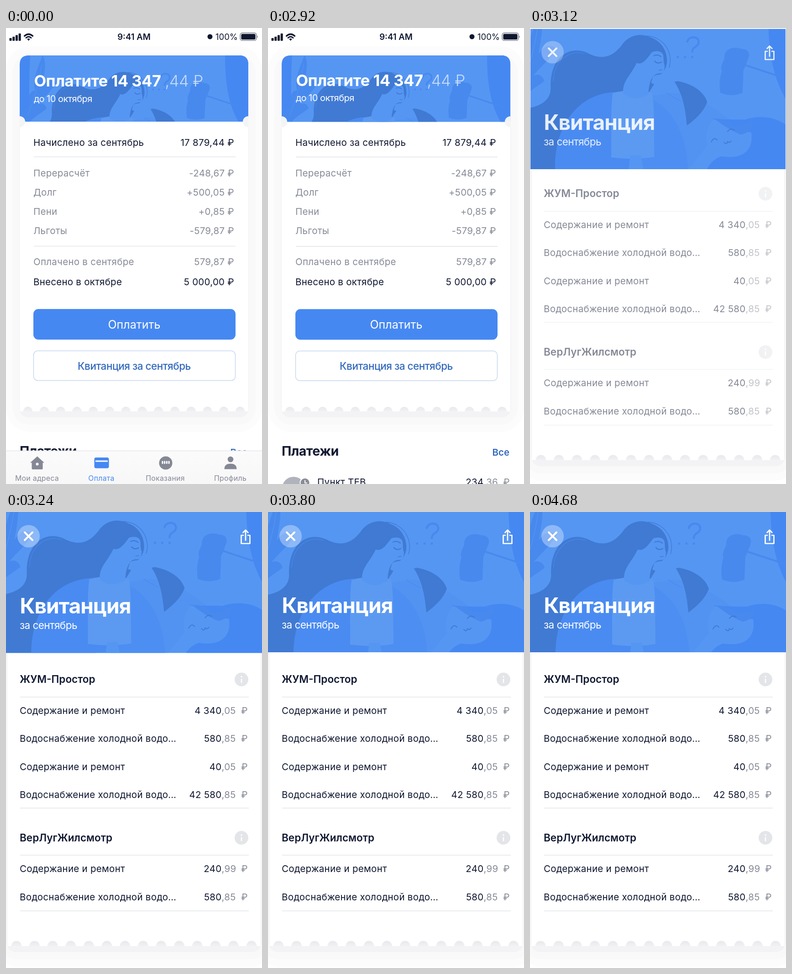
An HTML page that plays this animation: 561 px wide and 998 px high, repeating every 6.68 s.

```html
<!DOCTYPE html>
<html lang="ru">
<head>
<meta charset="utf-8">
<title>Оплата</title>
<style>
html, body { margin: 0; width: 100%; height: 100%; overflow: hidden; background: #fff; }
svg { display: block; width: 100%; height: 100%; font-family: Inter, Roboto, sans-serif; }
text { white-space: pre; }
</style>
</head>
<body>
<svg id="stage" viewBox="0 0 561 998" xmlns="http://www.w3.org/2000/svg"></svg>
<script>
const LOOP = 6680;
const INK = '#0f1730', GREY = '#868a96', BLUE = '#4688f2', LINK = '#3469bd';
const LIGHT = '#5596f3', DARK = '#407ad3', MID = '#4889ee';

const text = (x, y, size, str, { fill = INK, w = 400, a = 'start', ls = 0 } = {}) =>
  `<text x="${x}" y="${y}" font-size="${size}" font-weight="${w}" fill="${fill}" text-anchor="${a}" letter-spacing="${ls}">${str}</text>`;
const line = (x1, x2, y, c = '#e4e6ea') =>
  `<path d="M${x1} ${y}H${x2}" stroke="${c}" stroke-width="1.6"/>`;
const shape = (d, fill, more = '') => `<path d="${d}" fill="${fill}" ${more}/>`;
const stroke = (d, c, w, more = '') =>
  `<path d="${d}" fill="none" stroke="${c}" stroke-width="${w}" stroke-linecap="round" stroke-linejoin="round" ${more}/>`;
const dot = (x, y, r, fill, more = '') => `<circle cx="${x}" cy="${y}" r="${r}" fill="${fill}" ${more}/>`;
const box = (x, y, w, h, r, fill, more = '') =>
  `<rect x="${x}" y="${y}" width="${w}" height="${h}" rx="${r}" fill="${fill}" ${more}/>`;
const ROW = { ls: .27 };

function statusBar() {
  const bars = [6, 9, 12.5, 16].map((h, i) => box(7.5 + i * 6.7, 28 - h, 5, h, 1.2, INK)).join('');
  const wifi = stroke('M40.5 17.5Q49.5 9.5 58.5 17.5', INK, 3.2) +
    stroke('M44 21.5Q49.5 16.5 55 21.5', INK, 3) + shape('M46.3 24.3Q49.5 21.8 52.7 24.3L49.5 28Z', INK);
  const battery = box(513.2, 10.8, 35.6, 16.6, 4.5, 'none', 'stroke="#70747f" stroke-width="1.4"') +
    box(515.4, 13, 31.2, 12.2, 2.5, INK) + shape('M550.5 16.2Q553.4 19 550.5 22Z', '#70747f');
  return bars + wifi + text(280.5, 26, 18.5, '9:41 AM', { w: 600, a: 'middle' }) +
    dot(447, 19, 5.5, INK) + text(508, 26, 18.5, '100%', { a: 'end' }) + battery;
}

function picture() {
  const leaf = shape('M-60 190C-40 130 -30 120 -15 118C-25 90 -12 70 0 72C-10 40 10 5 20 -25C35 -10 22 40 20 62C34 40 48 42 58 50C44 76 24 90 8 110C20 104 30 112 32 122C10 140 -20 150 -40 200Z', MID) +
    stroke('M-20 140Q8 70 18 0', LIGHT, 1.2);
  const right = shape('M528 -80C523 30 530 115 575 175H660V-80Z', BLUE);
  const hand = shape('M430 72C428 52 448 44 468 51C480 51 486 58 484 68C480 78 478 86 472 98L470 148Q446 158 421 148C417 125 421 110 424 100C420 90 426 82 430 72Z', MID) +
    stroke('M474 86L580 121', MID, 4);
  const hair = shape('M-50 185C10 186 50 172 46 132C46 68 88 42 128 60C166 80 188 62 203 43C218 20 246 14 270 27C292 35 305 58 303 82Q300 100 288 108L255 160L190 330H-50Z', DARK) +
    stroke('M258 22C296 24 318 60 308 92', DARK, 1.3) + stroke('M52 122C52 82 84 50 122 62', MID, 1.2);
  const dress = shape('M56 320C52 236 96 150 190 146C250 142 345 170 350 320Z', '#4a8bf2');
  const sleeve = shape('M318 121C352 124 384 142 392 168C384 190 366 206 347 220C344 184 338 150 318 121Z', DARK);
  const arm = shape('M300 150C330 140 390 165 440 206L348 320H230V160Z', '#5092f3', 'opacity=".55"') +
    stroke('M303 148Q316 158 334 166', MID, 1.2);
  const torso = shape('M183 149Q225 136 270 148C276 180 274 240 275 289Q228 297 180 290C181 240 178 190 183 149Z', '#5c9af2') +
    shape('M222 286H245L252 320H218Z', LIGHT);
  const face = shape('M236 82C250 88 262 68 270 58Q286 52 294 62C297 72 294 78 298 88C297 96 299 106 284 105C270 107 263 124 262 151Q230 170 206 149C205 120 222 112 236 82Z', LIGHT) +
    shape('M272 112C284 104 302 106 326 122C310 126 304 122 292 131C284 134 276 129 268 126Z', LIGHT) +
    stroke('M276 78Q282 85 291 80', DARK, 2.4) + stroke('M274 66Q282 62 290 68', DARK, 2.2) + stroke('M285 98L292 97', DARK, 1.4);
  const cat = shape('M404 204C430 208 450 206 476 207C506 196 545 200 570 222V320H390C398 300 412 290 430 286Z', BLUE) +
    shape('M390 250C390 222 401 212 406 206C420 210 424 216 432 221C452 222 468 234 489 235C494 262 482 286 450 289C412 292 390 276 390 250Z', LIGHT) +
    shape('M408 205C428 204 440 210 450 221C470 222 478 216 494 210C490 230 482 237 466 240C446 232 430 222 408 205Z', MID) +
    stroke('M401 256Q407 244 414 252M437 233Q444 224 452 230M429 257Q435 264 437 255Q441 260 445 254', DARK, 2);
  const mark = [327, 343, 359].map(x => dot(x, 69, 2.6, MID)).join('') +
    stroke('M348 35C350 23 373 21 373 36C373 47 359 45 359 57', MID, 4.6);
  return box(-120, -120, 820, 560, 0, BLUE) + shape('M-5 -120H640V400H-20C-4 240 -30 60 -5 -120Z', LIGHT) +
    leaf + right + mark + hand + hair + dress + arm + sleeve + torso + face + cat;
}

function billBody() {
  const rows = [
    [257.5, 'Начислено за сентябрь', '17 879,44 ₽', INK],
    [325, 'Перерасчёт', '-248,67 ₽', GREY],
    [367, 'Долг', '+500,05 ₽', GREY],
    [409, 'Пени', '+0,85 ₽', GREY],
    [451, 'Льготы', '-579,87 ₽', GREY],
    [519, 'Оплачено в сентябре', '579,87 ₽', GREY],
    [563, 'Внесено в октябре', '5 000,00 ₽', INK]
  ].map(([y, name, sum, fill]) => text(60, y, 20.5, name, { ...ROW, fill }) +
    text(500, y, 20.5, sum, { ...ROW, fill, a: 'end' })).join('');
  return rows + line(61, 503, 282) + line(61, 503, 477.5) +
    box(60, 615, 443, 67, 11, BLUE) + text(281, 658, 25, 'Оплатить', { fill: '#fff', a: 'middle' }) +
    box(60.5, 706.5, 442, 65, 9, '#fff', 'stroke="#c6d8ef" stroke-width="1.5"') +
    text(281, 748, 22.5, 'Квитанция за сентябрь', { fill: LINK, w: 500, a: 'middle', ls: -.5 });
}

function receiptBody() {
  const care = 'Содержание и ремонт', water = 'Водоснабжение холодной водо…';
  const rows = [
    [441.5, care, '4 340', ',05'], [503, water, '580', ',85'], [564.5, care, '40', ',05'],
    [626, water, '42 580', ',85'], [788, care, '240', ',99'], [849.5, water, '580', ',85']
  ].map(([y, name, sum, cents]) => text(30, y, 20.5, name, ROW) + money(y, sum, cents)).join('');
  const heads = [[366, 'ЖУМ-Простор'], [712.5, 'ВерЛугЖилсмотр']].map(([y, name]) =>
    text(30, y + 8, 22.5, name, { w: 600 }) + dot(516, y + .5, 15, '#e4e5e8') +
    dot(516, y - 5.5, 1.7, '#fff') + stroke(`M516 ${y}V${y + 7}`, '#fff', 2.6)).join('');
  return rows + heads + [405, 648, 751, 873].map(y => line(31, 532, y)).join('');
}

function money(y, sum, cents) {
  return text(472.5, y, 20.5, sum, { ...ROW, a: 'end' }) +
    text(472.5, y, 20.5, cents, { ...ROW, fill: GREY }) +
    text(529.5, y, 20.5, '₽', { fill: GREY, a: 'end' });
}

function payments() {
  return text(30, 936, 28.5, 'Платежи', { w: 700, ls: -.4 }) +
    text(529, 936, 20.5, 'Все', { w: 600, fill: LINK, a: 'end' }) +
    dot(56, 1007, 25, '#b0b3bb') + dot(81, 995, 11.5, '#fff') + dot(81, 995, 9.5, '#898d98') +
    stroke('M81 990V995.5H85', '#fff', 2) + text(108, 1001, 20.5, 'Пункт ТЕВ', ROW) + money(1001, '234', ',36');
}

function tabBar() {
  const icon = '#858894';
  const home = shape('M68.500 937.500L84 951.500H80.500V964Q80.500 966 78.500 966H58.500Q56.500 966 56.500 964V951.500H53Z', icon) + dot(68.500, 954.500, 3, '#fff');
  const card = box(193.5, 940, 32, 23.5, 4, BLUE) + box(196, 946.5, 27, 3, 0, '#fff');
  const meter = dot(350, 952, 14.5, icon) +
    [0, 1, 2, 3].map(i => box(341.5 + i * 4.7, 947.5, 3, 6.5, 1.2, '#fff')).join('');
  const user = dot(492, 944, 6.3, icon) + shape('M478.500 965.500C478.500 956 485 953.500 492 953.500S505.500 956 505.500 965.500Z', icon);
  const names = [[68, 'Мои адреса'], [209, 'Оплата'], [349, 'Показания'], [491.5, 'Профиль']]
    .map(([x, s], i) => text(x, 991, 15.8, s, { a: 'middle', ls: .3, fill: i === 1 ? BLUE : icon })).join('');
  return box(0, 925, 561, 75, 0, 'url(#tab)') + line(0, 561, 925.5, '#e6e7ea') + home + card + meter + user + names;
}

const stage = document.getElementById('stage');
stage.innerHTML = `<defs>
  <clipPath id="top"><path id="topShape"/></clipPath>
  <clipPath id="paper"><rect id="paperShape"/></clipPath>
  <linearGradient id="tab" x2="0" y2="1"><stop stop-color="#fbfbfc"/><stop offset="1" stop-color="#f7f7f8"/></linearGradient>
  <linearGradient id="bump" x2="0" y2="1"><stop stop-color="#e8e9ed"/><stop offset="1" stop-color="#f1f1f3"/></linearGradient>
</defs>
<g id="status">${statusBar()}</g>
<g id="halo">${['#fcfcfc', '#f9f9fa', '#f3f3f5'].map(c => `<rect fill="${c}"/>`).join('')}</g>
<rect id="sheet" fill="#fff"/>
<path id="bumps" fill="url(#bump)"/>
<g clip-path="url(#paper)"><g id="bill">${billBody()}</g><g id="receipt">${receiptBody()}</g></g>
<g clip-path="url(#top)"><g id="art">${picture()}</g></g>
<path id="notches" fill="#f3f4f5"/>
<g id="billHead">${text(61.5, 128, 34.5, 'Оплатите 14 347', { w: 700, fill: '#fff', ls: -.5 })}
  ${text(348.5, 128, 34.5, ',44 ₽', { w: 300, fill: '#c8dcfb', ls: -.5 })}
  ${text(61, 161.5, 20, 'до 10 октября', { fill: '#fff', ls: -.5 })}</g>
<g id="receiptHead">${text(30.5, 221, 46, 'Квитанция', { w: 700, fill: '#fff', ls: -1 })}
  ${text(30, 254.5, 22.5, 'за сентябрь', { fill: '#fff', ls: -.55 })}</g>
<g id="tools">${dot(49.5, 53, 24.5, '#fff', 'opacity=".33"')}${stroke('M41 44.500L58 61.500M58 44.500L41 61.500', '#fff', 4)}
  ${stroke('M520 51H515.500V69H534.500V51H530M525 62V40M519.500 45L525 39.500L530.500 45', '#fff', 2.7)}</g>
<g id="pays">${payments()}</g>
<g id="tabs">${tabBar()}</g>`;

const el = {};
stage.querySelectorAll('[id]').forEach(n => el[n.id] = n);
const halo = [...el.halo.children];
const set = (node, attrs) => { for (const k in attrs) node.setAttribute(k, attrs[k]); };
const span = (t, a, b) => Math.min(1, Math.max(0, (t - a) / (b - a)));
const inOut = x => x < .5 ? 4 * x ** 3 : 1 - 4 * (1 - x) ** 3;
const mix = (a, b, k) => a + (b - a) * k;

function draw(t) {
  const p = inOut(span(t, 2900, 3180));
  const swell = Math.sin(Math.PI * span(t, 2900, 3300)) ** 2;
  const left = mix(30, 3, p), right = 561 - left, width = right - left;
  const top = mix(60, 0, p), edge = mix(205, 307, p) + 6 * swell, bottom = mix(839, 950, p);
  const hl = mix(30, 0, p), hr = 561 - hl, r = mix(20, 0, p);

  set(el.topShape, { d: `M${hl} ${edge}V${top + r}Q${hl} ${top} ${hl + r} ${top}H${hr - r}Q${hr} ${top} ${hr} ${top + r}V${edge}Z` });
  set(el.paperShape, { x: left, y: edge, width, height: bottom - edge });
  set(el.sheet, { x: left, y: edge - 1, width, height: bottom - edge + 1 });
  [[30, 20, 45, 52], [16, 0, 29, 36], [1.5, -140, 13, 20]].forEach(([d, up, down, rx], i) =>
    set(halo[i], { x: left - d, y: top - up, width: width + 2 * d, height: bottom + down - top + up, rx }));

  const br = width * .0205;
  let bumps = '';
  for (let i = 0; i < 14; i++)
    bumps += `M${left + width * (.036 + i * .0714) - br} ${bottom}a${br} ${br} 0 0 1 ${2 * br} 0z`;
  set(el.bumps, { d: bumps });
  set(el.notches, {
    d: `M${left} ${edge - 12}a12 12 0 0 1 0 24zM${right} ${edge - 12}a12 12 0 0 0 0 24z`,
    opacity: Math.max(0, 1 - 2 * p)
  });

  set(el.art, { transform: `translate(${mix(64, 0, p) - 3 * swell} ${mix(80, 0, p) - 8 * swell}) scale(${mix(.79, 1, p)})` });
  const out = 1 - span(t, 2930, 3020), inHead = span(t, 2980, 3140);
  set(el.bill, { opacity: out, transform: `translate(0 ${edge - 205})` });
  set(el.billHead, { opacity: out, transform: `translate(0 ${-40 * span(t, 2880, 3120) ** 2})` });
  set(el.receipt, { opacity: span(t, 3040, 3200), transform: `translate(0 ${-102 * (1 - p)})` });
  set(el.receiptHead, { opacity: inHead, transform: `translate(0 ${edge - 307})` });
  set(el.tools, { opacity: inHead });
  set(el.status, { opacity: 1 - span(t, 2930, 3040) });
  set(el.pays, { transform: `translate(0 ${bottom - 839})` });
  set(el.tabs, { transform: `translate(0 ${80 * inOut(span(t, 2680, 2900))})` });
}

const start = performance.now();
function tick() {
  draw((performance.now() - start) % LOOP);
  requestAnimationFrame(tick);
}
tick();
</script>
</body>
</html>
```
